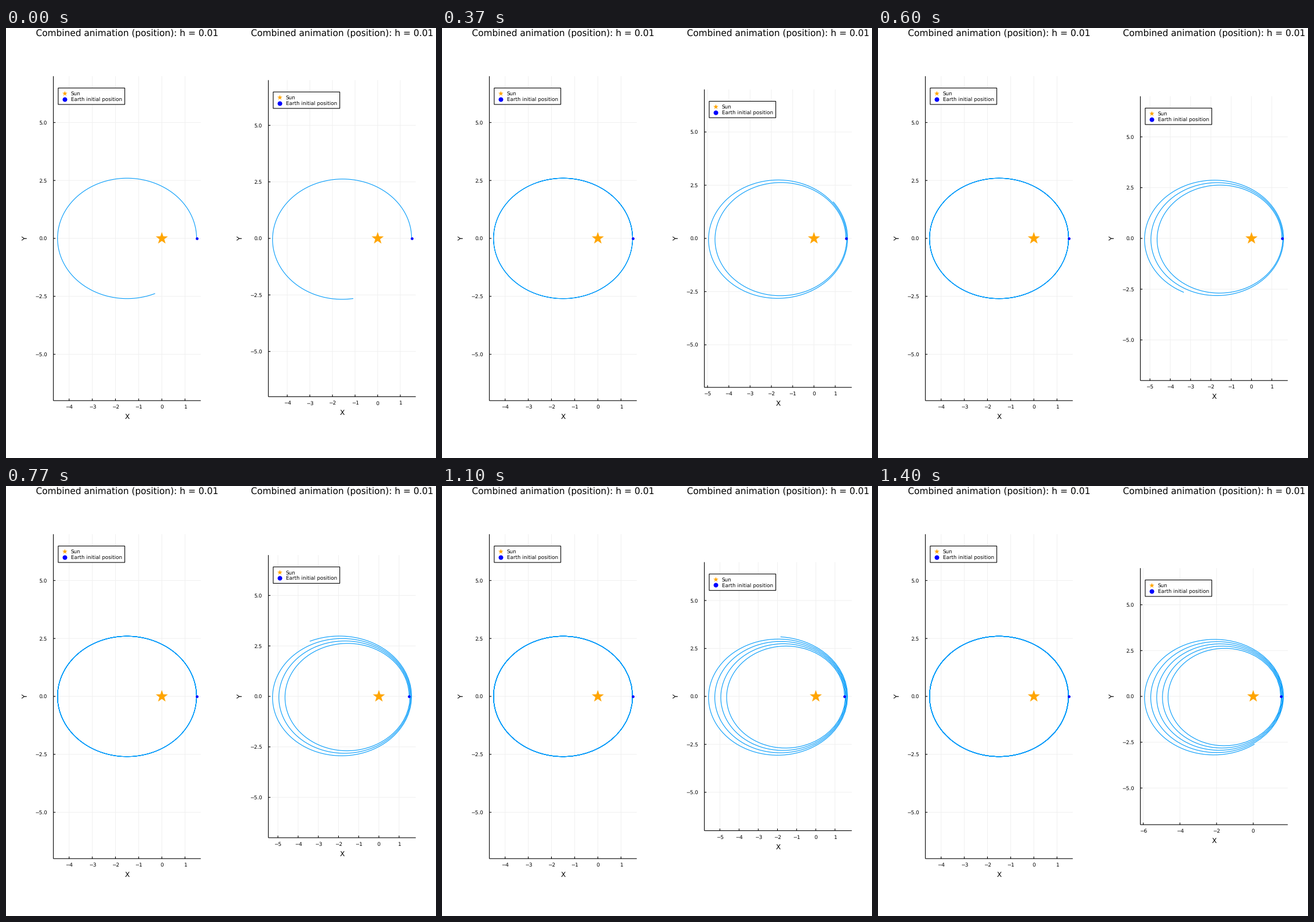
Animation of 748 by 748 pixels, one loop 1430 ms. Source, as a matplotlib script:

```python
import math

import matplotlib.pyplot as plt
import numpy as np
from matplotlib.animation import FuncAnimation
from matplotlib.collections import LineCollection
from matplotlib.patches import Polygon, Rectangle

SIZE, DPI = 748, 100
PT = 72 / DPI              # points per pixel
H = 0.01                   # integration step
FIRST, STRIDE, SHOTS = 2900, 400, 43
TICKS = 143                # 10 ms each, pictures change at 30 per second
MAX_POINTS = 400           # points drawn per trajectory

MID_Y, WIDTH, Y_LIM = 366, 256.4, 7
PANEL_X = (82.4, 456.4)
TITLE = "Combined animation (position): h = 0.01"
BLUE, ORANGE, DOT = "#009AFA", "#FFA500", "#0000FF"
GRID = "#F0F0F0"
SMALL, GUIDE, HEAD = 8.88, 12.2, 15.55

plt.rcParams["font.family"] = "DejaVu Sans"
plt.rcParams["text.hinting"] = "none"
plt.rcParams["path.snap"] = False


def accel(x, y):
    r3 = math.hypot(x, y) ** 3
    return -x / r3, -y / r3


def euler(x, y, u, v):
    ax_, ay_ = accel(x, y)
    return x + H * u, y + H * v, u + H * ax_, v + H * ay_


def leapfrog(x, y, u, v):
    ax_, ay_ = accel(x, y)
    u, v = u + H / 2 * ax_, v + H / 2 * ay_
    x, y = x + H * u, y + H * v
    ax_, ay_ = accel(x, y)
    return x, y, u + H / 2 * ax_, v + H / 2 * ay_


def integrate(step):
    state = (1.5, 0.0, 0.0, 1.0)
    path = [state[:2]]
    for _ in range(FIRST + STRIDE * (SHOTS - 1)):
        state = step(*state)
        path.append(state[:2])
    return np.array(path)


PATHS = integrate(leapfrog), integrate(euler)

fig = plt.figure(figsize=(SIZE / DPI, SIZE / DPI), dpi=DPI, facecolor="white")
ax = fig.add_axes([0, 0, 1, 1])


def text(x, y, s, size, ha="center", **kw):
    ax.text(x, y, s, fontsize=size * PT, ha=ha, va="baseline",
            color="black", **kw)


def segments(lines, color, width, z):
    ax.add_collection(LineCollection(lines, colors=color,
                                     linewidths=width * PT, zorder=z),
                      autolim=False)


def star(cx, cy, radius, z):
    points = []
    for i in range(10):
        r = radius * (0.4 if i % 2 else 1)
        a = i * math.pi / 5
        points.append((cx + r * math.sin(a), cy - r * math.cos(a)))
    ax.add_patch(Polygon(points, fc=ORANGE, ec="none", zorder=z))


def dot(cx, cy, radius, z):
    ax.plot(cx, cy, "o", ms=2 * radius * PT, mfc=DOT, mew=0, zorder=z)


def label(value, digits):
    return f"{value:.{digits}f}".replace("-", "\u2212")


def legend(x0, top):
    x, y = x0 + 8.4, top + 20.6
    ax.add_patch(Rectangle((x, y), 115.8, 28.6, fc="white", ec="black",
                           lw=1.1 * PT, zorder=6))
    star(x0 + 20, top + 30.3, 4.6, 7)
    dot(x0 + 20, top + 40, 4, 7)
    for row, name in enumerate(("Sun", "Earth initial position")):
        text(x0 + 30.3, top + 33.5 + 9.8 * row, name, SMALL, "left", zorder=7)


def panel(x0, path):
    low, high = path[:, 0].min(), path[:, 0].max()
    pad = 0.03 * (high - low)
    low, high = low - pad, high + pad
    scale = WIDTH / (high - low)
    top, bottom = MID_Y - Y_LIM * scale, MID_Y + Y_LIM * scale
    right = x0 + WIDTH

    def px(x):
        return x0 + (x - low) * scale

    def py(y):
        return MID_Y - y * scale

    step = 2 if low <= -6 else 1
    xs = [v for v in range(-6, 2, step) if low <= v <= high]
    ys = (-5.0, -2.5, 0.0, 2.5, 5.0)

    segments([[(px(v), top), (px(v), bottom)] for v in xs]
             + [[(x0, py(v)), (right, py(v))] for v in ys], GRID, 1, 1)
    segments([[(x0, top), (x0, bottom)], [(x0, bottom), (right, bottom)]]
             + [[(px(v), bottom), (px(v), bottom - 3.6)] for v in xs]
             + [[(x0, py(v)), (x0 + 3.6, py(v))] for v in ys],
             "black", 1.1, 3)
    for v in xs:
        text(px(v), bottom + 14.1, label(v, 0), SMALL)
    for v in ys:
        text(x0 - 10.7, py(v) + 3.2, label(v, 1), SMALL, "right")

    middle = x0 + WIDTH / 2
    text(middle, bottom + 32, "X", GUIDE)
    text(x0 - 45.2, MID_Y, "Y", GUIDE, rotation=90, rotation_mode="anchor")
    text(middle, 13.8, TITLE, HEAD)

    keep = np.linspace(0, len(path) - 1, MAX_POINTS).round().astype(int)
    ax.plot(px(path[keep, 0]), py(path[keep, 1]), color=BLUE, lw=1.1 * PT,
            solid_joinstyle="round", zorder=4)
    star(px(0), py(0), 11.1, 5)
    dot(px(1.5), py(0), 2.4, 5)
    legend(x0, top)


def update(tick):
    shot = (3 * tick + 1) // 10
    end = FIRST + STRIDE * shot + 1
    ax.clear()
    ax.set_axis_off()
    ax.set_autoscale_on(False)
    ax.set_xlim(0, SIZE)
    ax.set_ylim(SIZE, 0)
    for x0, path in zip(PANEL_X, PATHS):
        panel(x0, path[:end])
    return []


anim = FuncAnimation(fig, update, frames=TICKS, init_func=lambda: [],
                     interval=10, repeat=True, repeat_delay=0, blit=False)
plt.show()
```
